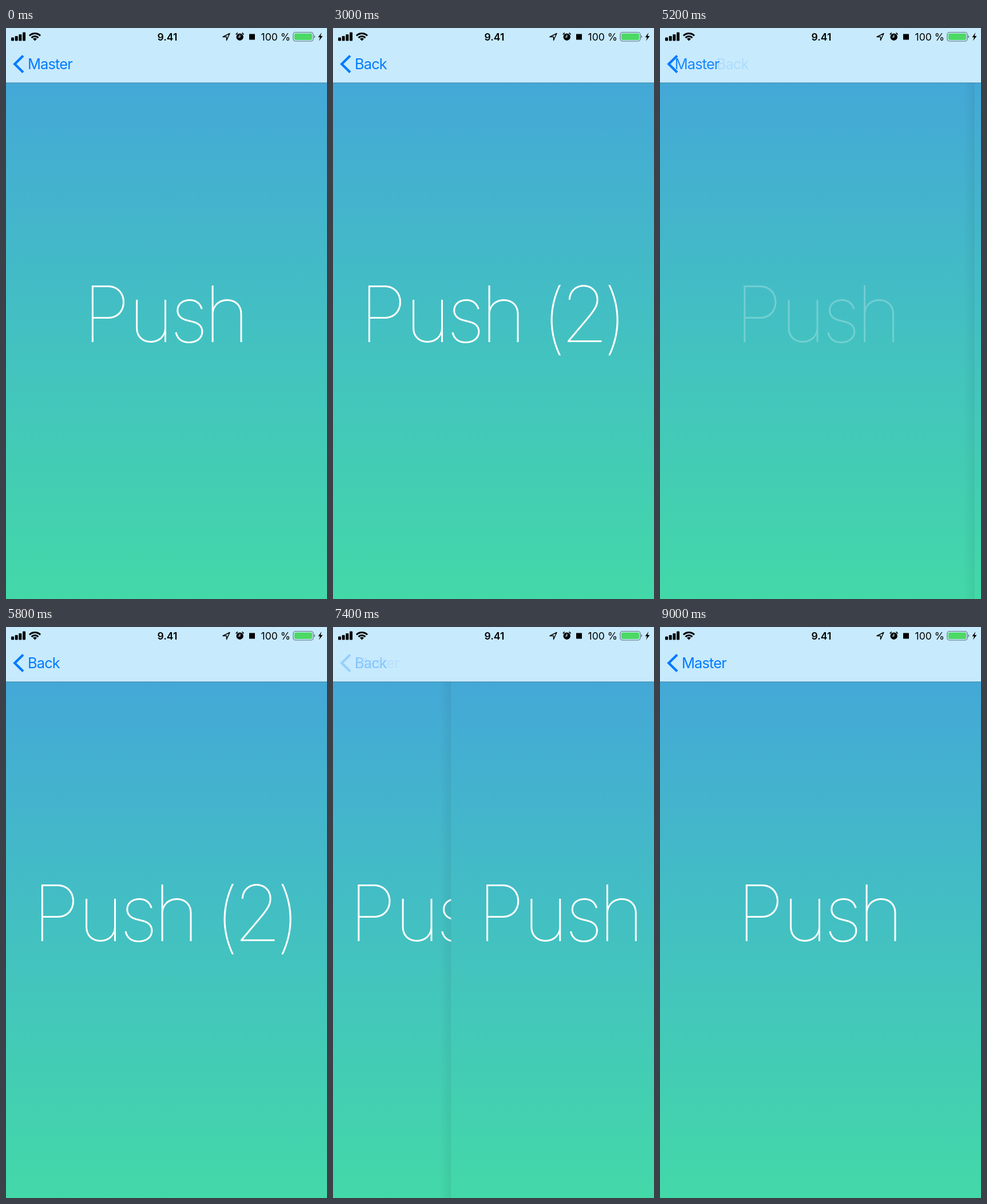
Recreate the animation shown at these times as an HTML page. Size 561x998 px, loop 9.7 s.

```html
<!DOCTYPE html>
<html lang="en">
<head>
<meta charset="utf-8">
<title>Navigation push and swipe</title>
<style>
  html, body { margin: 0; width: 100%; height: 100%; overflow: hidden; background: #c7eafd; }
  svg { display: block; width: 100%; height: 100%; }
  text { font-family: Inter, Roboto, sans-serif; }
  .title { font-size: 135.5px; font-weight: 100; fill: #fff; text-anchor: middle; }
  .status { font-size: 17.6px; text-anchor: middle; }
  .label { font-size: 25.4px; letter-spacing: -.85px; fill: #007aff; }
</style>
</head>
<body>
<svg viewBox="0 0 561 998" preserveAspectRatio="none">
  <defs>
    <linearGradient id="sea" x2="0" y2="1">
      <stop offset="0" stop-color="#44a8d7"/>
      <stop offset=".45" stop-color="#43bfc3"/>
      <stop offset="1" stop-color="#43d8a8"/>
    </linearGradient>
    <linearGradient id="shade">
      <stop offset="0" stop-opacity="0"/>
      <stop offset="1" stop-opacity=".06"/>
    </linearGradient>
  </defs>

  <rect y="95" width="561" height="903" fill="url(#sea)"/>
  <text id="first" class="title" y="549" x="175.5 253.5 320 386">Push</text>
  <g id="second">
    <rect id="shadow" x="-20" y="95" width="20" height="903" fill="url(#shade)"/>
    <rect y="95" width="561" height="903" fill="url(#sea)"/>
    <text class="title" y="549" x="87.5 165.5 232 298">Push</text>
    <text class="title" y="554" x="386">(</text>
    <text class="title" y="549" x="439.5">2</text>
    <text class="title" y="554" x="493">)</text>
  </g>

  <rect width="561" height="95.5" fill="#c7eafd"/>
  <rect y="95.5" width="561" height=".8" fill-opacity=".3"/>

  <g id="signal"></g>
  <g fill="none" stroke="#000" stroke-width="3">
    <path d="M41 13.5A13.2 13.2 0 0 1 60 13.5"/>
    <path d="M44.6 17.1A8.2 8.2 0 0 1 56.4 17.1"/>
  </g>
  <path d="M50.5 22.5L47 19A5 5 0 0 1 54 19Z"/>
  <text class="status" x="282" y="21.8" font-weight="600">9.41</text>
  <path d="M379 15.5L391 9.5L385.5 21.5V15.5Z" fill="none" stroke="#000" stroke-width="1.4" stroke-linejoin="round"/>
  <circle cx="408.7" cy="15.7" r="6.2"/>
  <path d="M402.3 10.8L404.3 8.9M413.1 8.9L415.1 10.8" stroke="#000" stroke-width="1.7" stroke-linecap="round"/>
  <path d="M408.7 11.8V15.9H405.7" fill="none" stroke="#c7eafd" stroke-width="1.3"/>
  <rect x="425" y="10.5" width="10" height="10"/>
  <text class="status" x="471.3" y="21.8">100 %</text>
  <rect x="502" y="7.5" width="35" height="15.5" rx="4" fill="none" stroke="#60737d" stroke-width="1.2"/>
  <rect x="504" y="9.5" width="31" height="11.5" rx="2.2" fill="#4cd964"/>
  <path d="M538.5 12.5Q542 15.2 538.5 18Z" fill="#60737d"/>
  <path d="M551.5 8L545.5 16.2H549L547 22.5L553.5 14H549.7Z"/>

  <path id="chevron" d="M30 48.5L15.2 63L30 77.5" fill="none" stroke="#007aff" stroke-width="4.2"/>
  <text id="master" class="label" x="38" y="72">Master</text>
  <text id="back" class="label" x="38" y="72">Back</text>
</svg>
<script>
const LOOP = 9700, STEP = 100, LAST = 9000;
const WIDTH = 561, SLIDE = 500, LABEL_SHIFT = 73;
const PUSHES = [1570, 5170], POP = 3350;
const DRAG_START = 6250, DRAG_END = 8150;
// Finger positions: time, x
const DRAG = [[DRAG_START, 0], [6850, 446], [7500, 190], [7600, 190], [DRAG_END, WIDTH]];

const $ = id => document.getElementById(id);
const clamp = v => Math.min(1, Math.max(0, v));
const smooth = u => u * u * (3 - 2 * u);
const slideEase = u => 1 - (1 - u) ** 3 * (1 + 3 * u);
const labelEase = u => 1 - (1 - u) ** 3;

$('signal').innerHTML = [6, 8.5, 11.5, 15].map((h, i) =>
  `<rect x="${9 + i * 6.7}" y="${22.5 - h}" width="5" height="${h}" rx="1.2"/>`).join('');

function dragX(t) {
  const i = DRAG.findIndex(key => t < key[0]);
  const [t0, x0] = DRAG[i - 1], [t1, x1] = DRAG[i];
  return x0 + (x1 - x0) * smooth((t - t0) / (t1 - t0));
}

function place(id, x, opacity) {
  $(id).setAttribute('transform', `translate(${x})`);
  $(id).setAttribute('opacity', opacity);
}

// Position of the upper page and look of the navigation bar
function navigation(t) {
  if (t >= DRAG_START && t < DRAG_END) {
    const x = dragX(t), p = x / WIDTH;
    const edge = clamp(Math.min(p, 1 - p) / 0.2);
    return { x, masterX: 0, backX: 0, master: p ** 2.6, back: (1 - p) ** 2.6, chevron: 1 - 0.76 * edge };
  }
  if (t >= POP && t < PUSHES[1]) {
    const u = clamp((t - POP) / SLIDE), e = labelEase(u);
    return {
      x: WIDTH * slideEase(u), chevron: 1,
      masterX: -LABEL_SHIFT * (1 - e), backX: LABEL_SHIFT * e,
      master: clamp(2 * u), back: clamp(1 - 2 * u)
    };
  }
  const start = PUSHES.findLast(p => t >= p);
  const u = start === undefined || t >= DRAG_END ? 0 : clamp((t - start) / SLIDE);
  const e = labelEase(u);
  return {
    x: WIDTH * (1 - slideEase(u)), chevron: 1,
    masterX: -LABEL_SHIFT * e, backX: LABEL_SHIFT * (1 - e),
    master: clamp(1 - 2 * u), back: clamp(2 * u)
  };
}

// The title dims while pressed and recovers once released
function titleOpacity(t) {
  const start = PUSHES.find(p => t >= p - 190 && t < p + SLIDE);
  return start === undefined ? 1 : 0.2 + 0.8 * clamp((t - start) / SLIDE);
}

function draw(now) {
  const t = Math.min(LAST, Math.floor((now % LOOP) / STEP) * STEP);
  const nav = navigation(t);
  place('first', -0.3 * (WIDTH - nav.x), titleOpacity(t));
  place('second', nav.x, 1);
  $('shadow').setAttribute('opacity', clamp((WIDTH - nav.x) / 10));
  place('master', nav.masterX, nav.master);
  place('back', nav.backX, nav.back);
  $('chevron').setAttribute('opacity', nav.chevron);
}

const origin = performance.now();
function tick() {
  draw(performance.now() - origin);
  requestAnimationFrame(tick);
}
tick();
</script>
</body>
</html>
```
